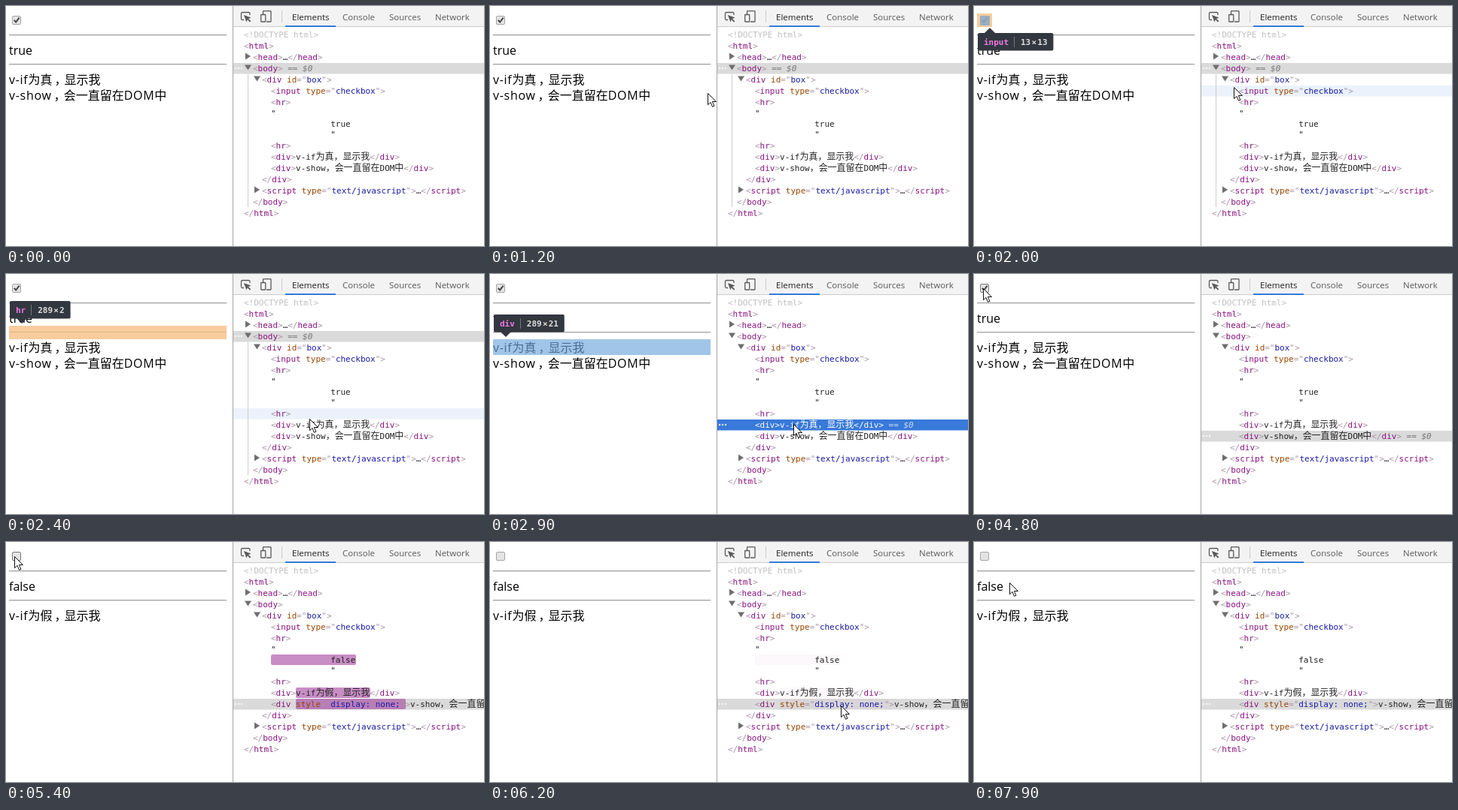
Write an HTML page that moves like this. It is 635 px wide and 320 px high and loops after 8000 ms.

```html
<!DOCTYPE html>
<html lang="zh">
<head>
<meta charset="utf-8">
<style>
  html, body { margin: 0; width: 100%; height: 100%; overflow: hidden; background: #fff; }
  svg { display: block; }
  text { white-space: pre; }
  .code { font: 11px "DejaVu Sans Mono", monospace; letter-spacing: -.02px; fill: #222; }
  .code .cjk { font: 12px "Noto Sans CJK SC", sans-serif; }
  .page { font: 16px "Open Sans", "Noto Sans", sans-serif; }
  .page .cjk { font: 16px "Noto Sans CJK SC", sans-serif; letter-spacing: 0; }
  .spaced { letter-spacing: .7px; }
  .tab { font: 11.5px "Open Sans", "Noto Sans", sans-serif; fill: #5a5a5a; }
  .tip { font: bold 11px "DejaVu Sans Mono", monospace; }
  .punct { fill: #a894a6; }
  .name { fill: #881280; }
  .attr { fill: #994500; }
  .value { fill: #1a1aa6; }
  .doctype { fill: #c0c0c0; }
  .eq { fill: #777; font-style: italic; }
  .back { fill: none; }
  .hover .back { fill: #ebf2fb; }
  .sel .back { fill: #dadada; }
  .sel.blue .back { fill: #3879d9; }
  .sel.blue text, .sel.blue tspan { fill: #fff; }
  .sel.blue .eq { fill: #c8dcf6; }
  .row:not(.sel) .eq, .row:not(.sel) .dots { display: none; }
  .dots { fill: #f8f8f8; }
  .arrow { fill: #6e6e6e; }
  .off .on-only, svg:not(.off) .off-only { display: none; }
</style>
</head>
<body>
<svg id="stage" width="635" height="320" viewBox="0 0 635 320">
  <rect width="635" height="320" fill="#fff"/>
  <g id="page"></g>
  <g id="overlay"></g>
  <rect x="302" width="333" height="320" fill="#fff"/>
  <rect x="302" width="333" height="27" fill="#f3f3f3"/>
  <path d="M302 27.5H635M366.5 6V22" stroke="#ccc"/>
  <path d="M301.5 0V320" stroke="#a3a3a3"/>
  <rect x="371" y="26" width="67" height="2" fill="#3879d9"/>
  <g fill="none" stroke="#5a5a5a" stroke-width="1.3">
    <path d="M316 18.5H314Q312.5 18.5 312.5 17V10Q312.5 8.5 314 8.5H322.5Q324 8.5 324 10V12"/>
    <path d="M341.5 11V7.5Q341.5 6.7 342.3 6.7H351.2Q352 6.7 352 7.5V20.3Q352 21 351.2 21H346"/>
    <rect x="338.7" y="11.5" width="6" height="9.5" rx=".7"/>
  </g>
  <path d="M316 12L325.5 15.6L322 17L325.3 20.3L324 21.6L320.7 18.3L319.4 21.5Z" fill="#5a5a5a"/>
  <g id="tabs"></g>
  <g id="tree"></g>
  <g id="tip"></g>
  <path id="cursor" d="M.5 .5V15.7L4 12.4L6.5 18.3L8.9 17.3L6.4 11.5H11.4Z" fill="#fff" stroke="#111"/>
</svg>
<script>
const $ = id => document.getElementById(id);
const LOOP = 8000, STEP = 100, CHAR = 6.6, UNCHECK = 5000;

const span = (cls, s) => `<tspan class="${cls}">${s}</tspan>`;
const mixed = s => s.replace(/[\u3000-\u9fff\uff00-\uffef]+/g, m => span("cjk", m));
const either = (a, b) => span("on-only", a) + span("off-only", b);

// Syntax colouring for one line of markup
function colour(s) {
  return s.replace(/(<\/?)(\w+)((?: \w+="[^"]*")*)>|[^<]+/g, (all, open, name, attrs) => {
    if (!open) return mixed(all);
    const list = attrs.replace(/ (\w+)="([^"]*)"/g, (_, k, v) =>
      " " + `${span("attr", k)}${span("punct", "=&quot;")}${span("value", v)}${span("punct", "&quot;")}`);
    return span("punct", open.replace("<", "&lt;")) + span("name", name) + list + span("punct", "&gt;");
  });
}

// Page; its commas sit in the middle of their cell
const prose = s => mixed(s).replace(/，(.)/, '<tspan dx="3">，</tspan><tspan dx="-3">$1</tspan>');
const pageText = (y, s, cls = "") => `<text class="page ${cls}" x="4" y="${y}">${s}</text>`;
const rule = y => `<path d="M4 ${y + .5}H293" stroke="#9a9a9a"/><path d="M4 ${y + 1.5}H293" stroke="#eee"/>`;
$("page").innerHTML =
  `<rect id="box" x="8.5" y="13.5" width="11" height="11" rx="1.5" fill="#e4e4e4" stroke="#a5a5a5"/>
   <path class="on-only" d="M10.8 18.8L13.2 21.5L17.6 15.6" fill="none" stroke="#444" stroke-width="2"/>` +
  rule(38) + pageText(65, either("true", "false")) + rule(77) +
  pageText(104, "v-if" + either(prose("为真，显示我"), prose("为假，显示我")), "spaced") +
  pageText(125, prose("v-show，会一直留在DOM中"), "spaced on-only");

// Inspector
$("tabs").innerHTML = [[380, "Elements"], [447, "Console"], [509, "Sources"], [570, "Network"]]
  .map(([x, s], i) => `<text class="tab" x="${x}" y="19"${i ? "" : ' style="fill:#222"'}>${s}</text>`).join("");

const lines = [
  [0, span("doctype", "&lt;!DOCTYPE html&gt;")],
  [0, colour("<html>")],
  [1, colour("<head>…</head>"), "shut"],
  [1, colour("<body>"), "open"],
  [2, colour('<div id="box">'), "open"],
  [3, colour('<input type="checkbox">')],
  [3, colour("<hr>")],
  [3, '"'],
  [3, " ".repeat(12) + either("true", "false")],
  [3, " ".repeat(12) + '"'],
  [3, colour("<hr>")],
  [3, either(colour("<div>v-if为真，显示我</div>"), colour("<div>v-if为假，显示我</div>"))],
  [3, either(colour("<div>v-show，会一直留在DOM中</div>"),
    colour('<div style="display: none;">v-show，会一直留在DOM中</div>'))],
  [2, colour("</div>")],
  [2, colour('<script type="text/javascript">…<\/script>'), "shut"],
  [1, colour("</body>")],
  [0, colour("</html>")]
];
const mid = k => 38 + 15 * k - (k > 8 ? 2 : k > 7 ? 1 : 0);
const arrow = (x, y, kind) => kind
  ? `<path class="arrow" d="${kind === "open" ? `M${x - 11} ${y - 4.5}h9l-4.5 7z` : `M${x - 10} ${y - 5.5}v9l7 -4.5z`}"/>` : "";
const flashes = [[8, 352, 113], [11, 385, 99], [12, 385, 146]];

$("tree").innerHTML = lines.map(([depth, s, kind], k) => {
  const x = 316 + 12 * depth, y = mid(k);
  const flash = flashes.filter(f => f[0] === k).map(f =>
    `<rect class="flash" x="${f[1]}" y="${y - 7}" width="${f[2]}" height="14" rx="2" fill="#9e3699"/>`).join("");
  return `<g class="row"><rect class="back" x="302" y="${y - 7}" width="333" height="14.5"/>${flash}
    <g class="dots">${[305, 309, 313].map(c => `<circle cx="${c}" cy="${y}" r="1.2"/>`).join("")}</g>
    ${arrow(x, y, kind)}<text class="code" x="${x}" y="${y + 4}">${s}${span("eq", " == $0")}</text></g>`;
}).join("") + '<path id="guide" d="M321.5 91V268" stroke="#ccc"/>';
const rows = [...document.querySelectorAll(".row")];
const flashRects = [...document.querySelectorAll(".flash")];

// Highlighted elements: tag, w, h, overlay top and height
const input = ["input", 13, 13, 10, 18], topRule = ["hr", 289, 2, 30, 18],
  lowRule = ["hr", 289, 2, 69, 18], ifDiv = ["div", 289, 21, 87, 21], showDiv = ["div", 289, 21, 108, 21];

// from, to, row, highlighted element
const hovers = [
  [600, 700, 2], [2000, 2200, 5, input], [2200, 2300, 6, topRule], [2300, 2400, 8],
  [2400, 2500, 10, lowRule], [2500, 3400, 11, ifDiv], [3400, 3900, 12, showDiv]
];

function overlay([tag, w, h, y, full]) {
  const rect = (x, y, w, h, c) => `<rect x="${x}" y="${y}" width="${w}" height="${h}" fill="rgba(${c},.66)"/>`;
  const orange = "246,178,107", content = "111,168,220";
  if (tag === "div") return rect(4, y, w, h, content);
  if (tag === "hr") return rect(4, y, w, 8, orange) + rect(4, y + 8, w, 2, "250,195,125") + rect(4, y + 10, w, 8, orange);
  return rect(4, y, 20, full, orange) + rect(8, y + 3, w, h, content);
}

function tooltip([tag, w, h, y, full]) {
  const below = y < 33, top = below ? y + full + 8 : y - 33;
  const sep = 13 + tag.length * CHAR + 8, width = `${w}×${h}`.length * CHAR + 2.4;
  const tri = below ? `M14 ${top}L21 ${top - 7}L28 ${top}Z` : `M14 ${top + 23}L21 ${top + 30}L28 ${top + 23}Z`;
  return `<rect x="5" y="${top}" width="${sep + width + 11}" height="23.5" rx="2" fill="#333740"/>
    <path d="${tri}" fill="#333740"/>
    <path d="M${Math.round(sep) - .5} ${top + 5}v14" stroke="#777"/>
    <text class="tip" y="${top + 16}"><tspan x="13" fill="#ee78e6">${tag}</tspan><tspan
      x="${sep + 8}" fill="#ddd">${w}</tspan><tspan dx="1.2" fill="#ddd">×</tspan><tspan dx="1.2" fill="#ddd">${h}</tspan></text>`;
}

// time, x, y
const path = [
  [500, 616, 48], [700, 406, 64], [800, 406, 64], [1200, 289, 116], [1300, 245, 168], [1400, 184, 188],
  [1700, 48, 110], [2000, 345, 108], [2200, 395, 132], [2300, 402, 165], [2400, 403, 193], [2600, 403, 200],
  [3000, 403, 200], [3200, 386, 200], [3300, 386, 200], [3400, 394, 217], [3700, 394, 217], [4200, 138, 203],
  [4300, 115, 203], [4400, 71, 157], [4800, 12, 19], [5200, 12, 19], [5700, 9, 19], [5800, 9, 19],
  [6200, 466, 218], [6400, 463, 219], [6500, 463, 219], [6800, 221, 198], [7000, 141, 204], [7600, 141, 204],
  [7700, 85, 125], [7900, 47, 54], [LOOP, 47, 54]
];

function cursorAt(t) {
  const i = path.findIndex(p => p[0] > t);
  const [t0, x0, y0] = path[i - 1], [t1, x1, y1] = path[i];
  const p = (t - t0) / (t1 - t0);
  return [Math.round(x0 + (x1 - x0) * p), Math.round(y0 + (y1 - y0) * p)];
}

let last = -1;
function draw(t) {
  const hover = hovers.find(h => t >= h[0] && t < h[1]) || [];
  const selected = t < 2700 ? 3 : t < 3600 ? 11 : 12;
  const blue = t >= 2700 && t < 4400;
  rows.forEach((row, k) => {
    row.classList.toggle("sel", k === selected);
    row.classList.toggle("blue", k === selected && blue);
    row.classList.toggle("hover", k === hover[2]);
  });
  $("guide").style.display = selected === 3 ? "" : "none";
  $("overlay").innerHTML = hover[3] ? overlay(hover[3]) : "";
  $("tip").innerHTML = hover[3] ? tooltip(hover[3]) : "";
  $("stage").classList.toggle("off", t >= UNCHECK);
  $("box").setAttribute("stroke", t >= 4700 && t < 5900 ? "#777" : "#a5a5a5");

  const fade = (t - UNCHECK) / 1400;
  const glow = fade < 0 || fade > 1 ? 0 : (1 - fade) ** 1.7;
  flashRects.forEach(r => r.setAttribute("opacity", glow));

  $("cursor").style.display = t < 500 ? "none" : "";
  if (t >= 500) $("cursor").setAttribute("transform", `translate(${cursorAt(t)})`);
}

function tick() {
  const t = Math.floor(performance.now() % LOOP / STEP) * STEP;
  if (t !== last) draw(last = t);
  requestAnimationFrame(tick);
}
tick();
</script>
</body>
</html>
```
